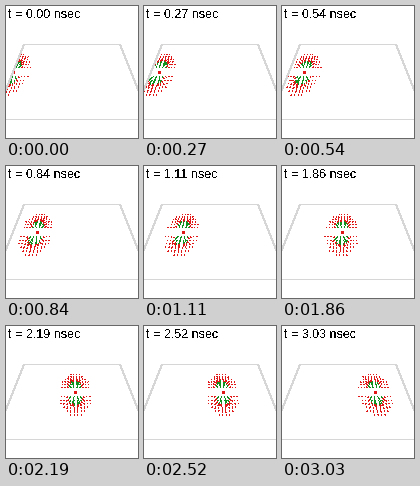
Write a matplotlib script that moves like this. It is 132x132 px and loops after 3.06 s.

```python
import numpy as np
import matplotlib.pyplot as plt
from matplotlib.animation import FuncAnimation

SIZE, FRAMES, STEP = 132, 102, 30
RED, GREEN, GREY = (224, 24, 24), (16, 146, 32), "#d6d6d6"
START, SPEED = 7.0, 28.4
MID, EYE = 66.0, 148.0  # screen centre, distance below the vanishing point

fig = plt.figure(figsize=(SIZE / 100, SIZE / 100), dpi=100, facecolor="white")
ax = fig.add_axes([0, 0, 1, 1])
canvas = ax.imshow(np.full((SIZE, SIZE, 3), 255, np.uint8),
                   extent=(0, SIZE, SIZE, 0), interpolation="nearest")
ax.set(xlim=(0, SIZE), ylim=(SIZE, 0), aspect="auto")
ax.axis("off")

for xs, ys in (([0, 18, 114, 132], [83.5, 38.5, 38.5, 83.5]),
               ([0, 132], [112.5, 112.5])):
    ax.plot(xs, ys, color=GREY, lw=0.72, antialiased=False)
label = ax.text(1.5, 12, "", family="Liberation Sans", size=9,
                color="black", antialiased=False)

# Lattice on the floor: u along the track, v in depth on both sides of it.
rows = 4.6 + 3.0 * np.arange(6)
gu, gv = (g.ravel() for g in np.meshgrid(
    np.arange(8, 126, 3.0), np.r_[-rows[::-1], rows]))
along = np.linspace(0, 1, 24)[:, None]


def project(u, v):
    near = 1 / (1 - v / EYE)
    return MID + (u - MID) * near, MID + EYE * (near - 1)


def paint(img, u, v, color):
    x, y = (np.floor(p).astype(int) for p in project(u, v))
    ok = (x >= 0) & (x < SIZE) & (y >= 0) & (y < SIZE)
    img[y[ok], x[ok]] = color


def draw(n):
    t = n * STEP / 1000
    cx = START + SPEED * t
    du = gu - cx
    keep = (du / 16.5) ** 2 + (gv / 21) ** 2 < 1
    u, v, du = gu[keep], gv[keep], du[keep]
    r = np.hypot(du, v)
    length = np.clip(330 * (v / r) ** 2 / r**2, 0.5, 8)
    head = np.minimum(length, 1.3)

    def span(a, b):
        s = a + (b - a) * along
        return u + du / r * s, v + v / r * s

    img = np.full((SIZE, SIZE, 3), 255, np.uint8)
    big = length > 2
    su, sv = span(0, length - head)
    paint(img, su[:, big], sv[:, big], GREEN)
    paint(img, *span(length - head, length), RED)
    x = int(round(cx))
    img[65:68, max(x - 1, 0):x + 2] = RED
    canvas.set_data(img)
    label.set_text(f"t = {t:.2f} nsec")
    return canvas, label


anim = FuncAnimation(fig, draw, frames=FRAMES, interval=STEP,
                     repeat=True, repeat_delay=0)
plt.show()
```
